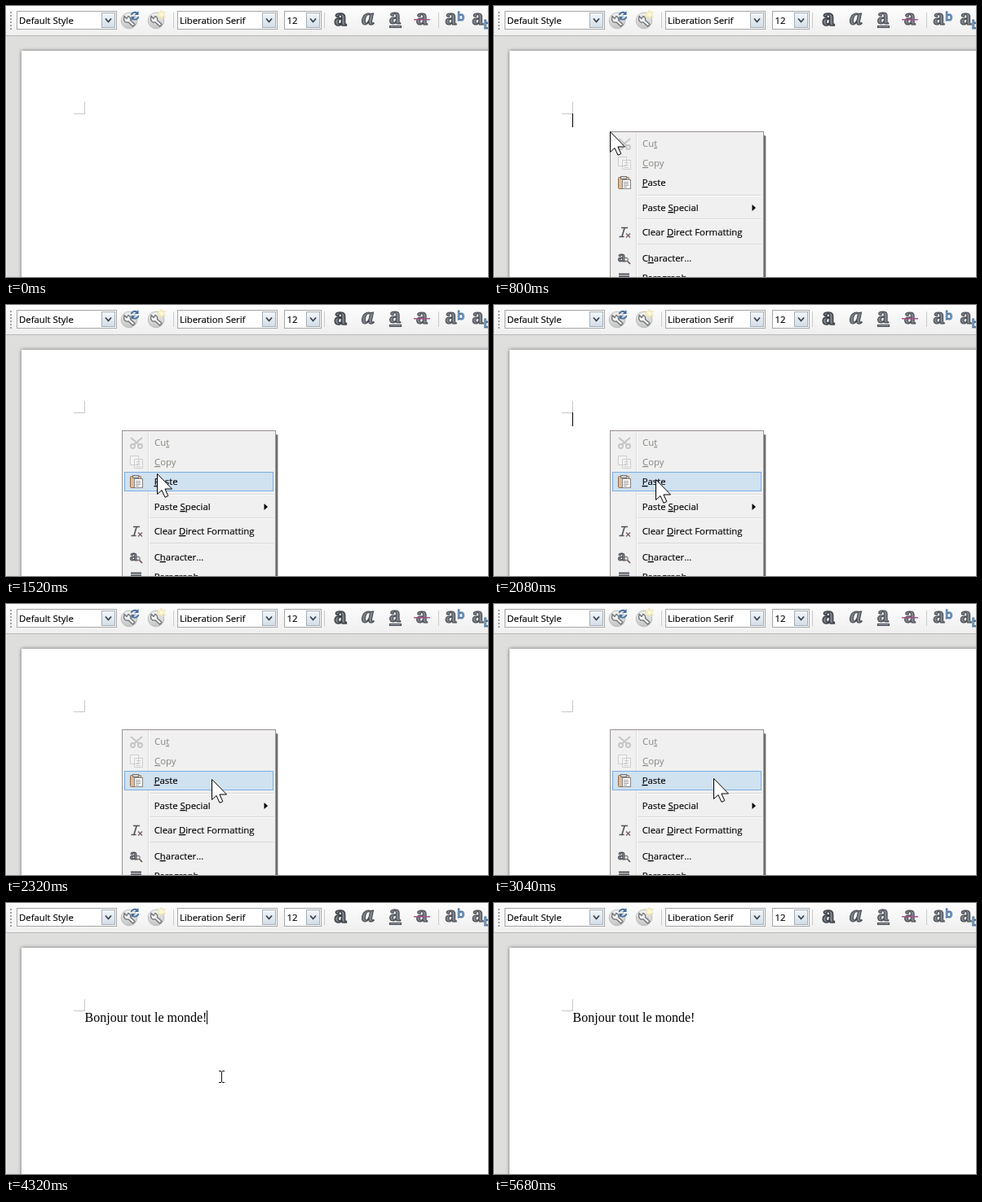
Animation of 591 by 333 pixels, one loop 5.96 s. Source, as an HTML page:

```html
<!DOCTYPE html>
<html lang="en">
<head>
<meta charset="utf-8">
<title>Paste from the context menu</title>
<style>
  html, body { margin: 0; width: 100%; height: 100%; overflow: hidden; background: #dededd; }
  svg { display: block; }
  text { white-space: pre; }
  .ui { font: 11.35px "Open Sans", "Noto Sans", sans-serif; stroke: #000; stroke-width: .15; }
  .u { text-decoration: underline; }
  .off { fill: #85857f; stroke: none; }
  .crisp { shape-rendering: crispEdges; }
  .glyph { font: 25px "Noto Serif", serif; font-weight: 600; fill: #7d838c; stroke: #3f4247; stroke-width: 1; }
  .glyph .bold { font-size: 27px; font-weight: 700; stroke-width: 1.6; }
  .glyph .slant { font-style: italic; }
  .blue { font: 600 15px "Open Sans", sans-serif; fill: #8fb3d6; stroke: #3a6391; stroke-width: .8; }
  .doc { font: 16px "Liberation Serif", "Times New Roman", serif; }
</style>
</head>
<body>
<svg width="591" height="333" viewBox="0 0 591 333">
  <defs>
    <linearGradient id="bar" x2="0" y2="1"><stop stop-color="#fdfdfd"/><stop offset="1" stop-color="#efefef"/></linearGradient>
    <linearGradient id="btn" x2="0" y2="1"><stop stop-color="#f3f6f9"/><stop offset="1" stop-color="#d3dde7"/></linearGradient>
    <linearGradient id="disc" x2="0" y2="1"><stop stop-color="#f2f2f1"/><stop offset="1" stop-color="#c3c4c4"/></linearGradient>
    <g id="drop" class="crisp">
      <rect x="-17.5" y="8.5" width="16" height="18" fill="url(#btn)" stroke="#a3adb7"/>
      <path d="M-13 15.5l3.5 4 3.5-4" fill="none" stroke="#39424c" stroke-width="1.8" shape-rendering="auto"/>
    </g>
    <g id="wrench">
      <circle r="9.8" fill="url(#disc)" stroke="#bcbcbb"/>
      <path d="M-6-5.500L-3-2.500-1-5.500A4.500 4.500 0 0 1 1.500-.500L7 4.500 4.500 7-1 2A4.500 4.500 0 0 1-6.500-1z" fill="#f3f3f3" stroke="#6c7075" stroke-width="1.300" stroke-linejoin="round"/>
    </g>
  </defs>

  <!-- page -->
  <rect x="19" y="55" width="600" height="320" fill="#fff" style="filter:drop-shadow(0 0 2px #666)"/>
  <rect y="37" width="1" height="296" fill="#efefee"/>
  <path class="crisp" d="M83 132.500h14M96.500 118v14" stroke="#c8c8c8"/>

  <!-- toolbar -->
  <rect width="591" height="36" fill="url(#bar)"/>
  <rect y="36" width="591" height="1" fill="#b9b9b8"/>
  <path class="crisp" d="M6 7v22" stroke="#a2a2a2" stroke-width="2" stroke-dasharray="2 2"/>
  <path class="crisp" d="M205.500 8v19M390.500 8v19M530.500 8v19" stroke="#cacaca"/>
  <g class="crisp" fill="#fff" stroke="#a6a6a6">
    <rect x="13.500" y="6.500" width="122" height="22"/>
    <rect x="210.500" y="6.500" width="122" height="22"/>
    <rect x="341.500" y="6.500" width="45" height="22"/>
  </g>
  <use href="#drop" x="135"/><use href="#drop" x="332"/><use href="#drop" x="386"/>
  <g class="ui">
    <text x="16" y="22">Default Style</text>
    <text x="213" y="22">Liberation Serif</text>
    <text x="344.500" y="22">12</text>
  </g>
  <use href="#wrench" x="151" y="18"/>
  <path d="M153.500 11A4.600 4.600 0 0 1 161 9M162.500 13A4.600 4.600 0 0 1 155 15.500" fill="none" stroke="#456f9c" stroke-width="1.800"/>
  <path d="M162.500 6v5h-5zM153.500 18v-5h5z" fill="#456f9c"/>
  <use href="#wrench" x="184" y="18"/>
  <path d="M190.500 5l1.300 3 3.700-.500-2.300 3 2.300 3-3.700-.500-1.300 3-1.300-3-3.700.500 2.300-3-2.300-3 3.700.500z" fill="#fdf8d2" stroke="#e6dba3" stroke-width=".8"/>

  <g class="glyph">
    <text class="bold" x="402" y="23.500">a</text>
    <text class="slant" x="435.500" y="23">a</text>
    <text x="469.500" y="22">a</text>
    <text x="502.500" y="23">a</text>
    <text x="538" y="23">a</text>
    <text x="571" y="23">a</text>
  </g>
  <rect x="470.500" y="24.500" width="14" height="2" fill="#a4abb5" stroke="#3f4247"/>
  <rect x="500" y="16" width="20" height="1.500" fill="#a8508a"/>
  <text class="blue" x="553" y="17.500">b</text>
  <text class="blue" x="585.500" y="27.500">b</text>

  <text id="line" class="doc" x="96.600" y="146">Bonjour tout le monde!</text>
  <rect id="caret" y="132" width="1" height="17"/>

  <!-- context menu -->
  <g id="menu">
    <rect x="146" y="160" width="188" height="190" opacity=".2"/>
    <rect x="146" y="159" width="187" height="190" opacity=".45"/>
    <rect x="142.500" y="154.500" width="188" height="190" fill="#f0f0f0" stroke="#978f8f"/>
    <g class="crisp">
      <path d="M174.500 156v177M175 232.500h153M175 261.500h153M175 292.500h153" stroke="#d9d9d9"/>
      <path d="M175.500 156v177M176 233.500h152M176 262.500h152" stroke="#fcfcfc"/>
      <rect id="hover" x="145.500" y="205.500" width="182" height="23" fill="#d0e1f0" stroke="#78aee5"/>
    </g>
    <g class="ui">
      <text class="off" x="182" y="173">Cu<tspan class="u">t</tspan></text>
      <text class="off" x="182" y="197"><tspan class="u">C</tspan>opy</text>
      <text x="181.700" y="221"><tspan class="u">P</tspan>aste</text>
      <text x="181.700" y="252">Paste <tspan class="u">S</tspan>pecial</text>
      <text x="181.700" y="282">Clear <tspan class="u">D</tspan>irect Formatting</text>
      <text x="181.700" y="314">C<tspan class="u">h</tspan>aracter...</text>
      <text x="181.700" y="338">Paragraph...</text>
    </g>
    <path d="M316.500 244l4.500 4-4.500 4z"/>
    <g fill="none" stroke="#c4c4c4" stroke-width="1.800">
      <path d="M153 163l9.500 8M167 163l-9.500 8"/>
      <circle cx="155.500" cy="173.500" r="2.500"/><circle cx="164.500" cy="173.500" r="2.500"/>
    </g>
    <g fill="#f4f4f4" stroke="#cdcdcd">
      <path d="M152.500 185.500h10v11h-10zM157.500 189.500h10v11h-10z"/>
      <path d="M160 192.500h5M160 195.500h5M160 198.500h5"/>
    </g>
    <rect x="152.500" y="210.500" width="13" height="14" rx="1" fill="#dcbd9b" stroke="#936a45"/>
    <rect x="155.500" y="209.500" width="7" height="3" fill="#d5d5d5" stroke="#777"/>
    <rect x="157.500" y="213.500" width="10" height="11" fill="#fff" stroke="#858585"/>
    <path d="M159 216.500h6M159 218.500h6M159 220.500h6M159 222.500h4" stroke="#9a9a9a"/>
    <path d="M156 272.500h8M153.500 283.500h6M160 273l-3 10" fill="none" stroke="#505359" stroke-width="1.600"/>
    <path d="M162 279.500l5 5M167 279.500l-5 5" stroke="#795b64" stroke-width="1.300"/>
    <text class="glyph" x="151.500" y="314" style="font-size:17px;stroke-width:.8">a</text>
    <circle cx="162" cy="311.500" r="2.300" fill="#ddd" stroke="#666"/>
    <path d="M163.500 313.500l3.500 3.500" stroke="#6b4b45" stroke-width="1.600"/>
    <path d="M153 329.500h13M153 332.500h13" stroke="#50545b" stroke-width="2"/>
  </g>

  <path id="arrow" d="M.500.500v25l5.500-5 4 8.800 3.800-1.700-3.900-8.600h8.600z" fill="#fff" stroke="#000"/>
  <path id="beam" class="crisp" d="M-3 -6.500h3M1 -6.500h3M.500 -6v13M-3 7.500h3M1 7.500h3" fill="none" stroke="#111"/>
</svg>
<script>
  const LOOP = 5960, STEP = 40;
  const OPEN = 760, PASTE = 3120, RELEASE = 3160, LEAVE = 5280;

  // pointer path: time, x, y
  const path = [
    [120, 241, 326], [240, 205, 250], [360, 160, 186], [480, 139, 158], [560, 142, 154],
    [1240, 142, 154], [1400, 163, 181], [1520, 185, 207], [1680, 191, 214],
    [2040, 191, 214], [2160, 212, 215], [2320, 252, 215], [2440, 265, 215], [2560, 269, 214],
    [3120, 269, 214], [3160, 264, 213],
    [5120, 264, 213], [5160, 270, 222], [5200, 292, 255], [5240, 327, 298]
  ];
  const blinks = [[800, 1240], [1680, 2160], [2560, 3040], [PASTE, 3840], [4320, 4760], [5240, 5680]];

  const el = id => document.getElementById(id);
  const [line, caret, menu, hover, arrow, beam] = ["line", "caret", "menu", "hover", "arrow", "beam"].map(el);
  const show = (node, on) => node.style.display = on ? "" : "none";
  const within = (t, a, b) => t >= a && t < b;

  function pointerAt(t) {
    const i = path.findIndex(p => p[0] > t);
    if (i < 0) return path[path.length - 1].slice(1);
    if (i === 0) return path[0].slice(1);
    const [a, b] = [path[i - 1], path[i]];
    const k = (t - a[0]) / (b[0] - a[0]);
    return [1, 2].map(j => Math.round(a[j] + (b[j] - a[j]) * k));
  }

  function draw(now) {
    const t = Math.floor(now % LOOP / STEP) * STEP;
    const [x, y] = pointerAt(t);
    for (const node of [arrow, beam]) node.setAttribute("transform", `translate(${x} ${y})`);
    show(arrow, within(t, OPEN, RELEASE));
    show(beam, within(t, 120, OPEN) || within(t, RELEASE, LEAVE));
    show(menu, within(t, OPEN, PASTE));
    show(hover, y >= 205);
    show(line, t >= PASTE);
    show(caret, blinks.some(([a, b]) => within(t, a, b)));
    caret.setAttribute("x", t < PASTE ? 96 : 246);
  }

  let start;
  function tick(now) {
    start ??= now;
    draw(now - start);
    requestAnimationFrame(tick);
  }
  draw(0);
  requestAnimationFrame(tick);
</script>
</body>
</html>
```
